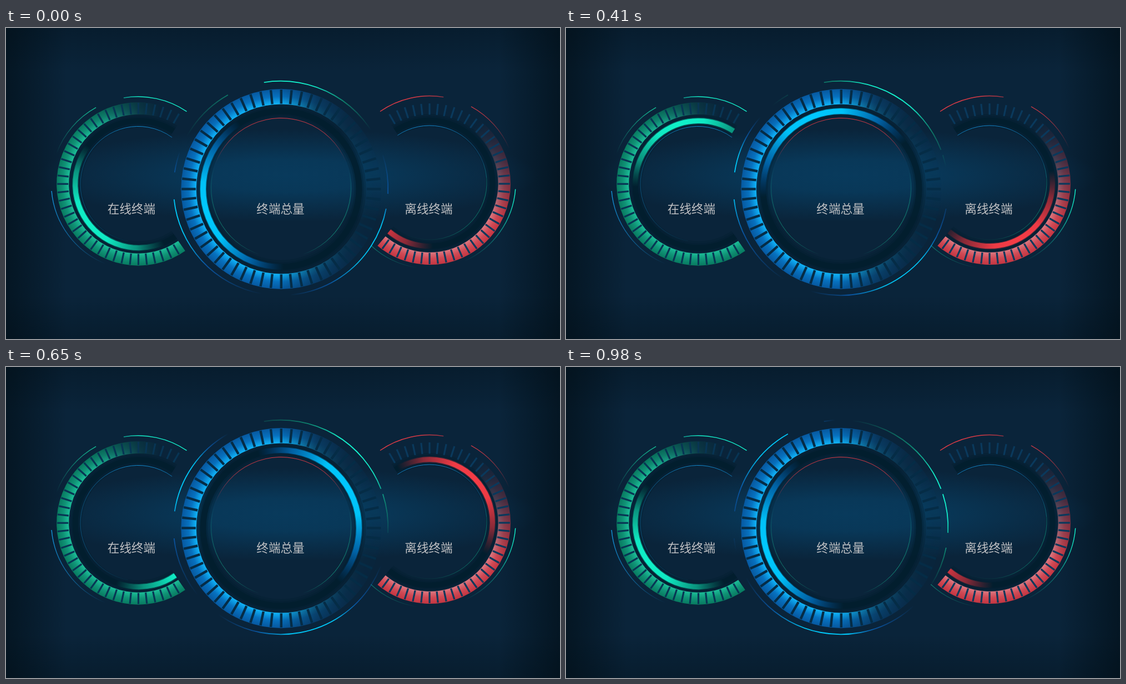
Recreate the animation shown at these times as an HTML page with a canvas. Size 998 by 561 pixels, loop 1.58 s.

```html
<!DOCTYPE html>
<html lang="zh">
<head>
<meta charset="utf-8">
<style>
  html, body { margin: 0; width: 100%; height: 100%; overflow: hidden; background: #0a2337; }
  canvas, svg { position: absolute; left: 0; top: 0; width: 998px; height: 561px; display: block; }
  text { font: 300 21.6px "Noto Sans CJK SC", "Noto Sans CJK", "Noto Sans CJK JP", sans-serif; fill: #bfc0c3; text-anchor: middle; }
</style>
</head>
<body>
<canvas id="stage" width="998" height="561"></canvas>
<svg viewBox="0 0 998 561">
  <text x="226" y="333.5">在线终端</text>
  <text x="494.5" y="333.5">终端总量</text>
  <text x="761.5" y="333.5">离线终端</text>
</svg>
<script>
const W = 998, H = 561, LOOP = 1580;
const rad = deg => deg * Math.PI / 180;
const rgba = (rgb, a) => `rgba(${rgb},${a})`;

const layer = () => {
  const c = document.createElement('canvas');
  c.width = W;
  c.height = H;
  return c.getContext('2d');
};

// Conic gradient whose stops are [degrees from mid, colour], clockwise.
function conic(g, x, y, mid, stops) {
  const grad = g.createConicGradient(rad(mid - 180), x, y);
  stops.forEach(([d, color]) => grad.addColorStop((d + 180) / 360, color));
  return grad;
}

function arc(g, x, y, r, from, to, width, style) {
  g.beginPath();
  g.arc(x, y, r, rad(from), rad(to));
  g.lineWidth = width;
  g.strokeStyle = style;
  g.stroke();
}

// Arc in one colour whose opacity follows [angle, alpha] points.
function fadeArc(g, x, y, r, width, rgb, points) {
  const from = points[0][0], to = points[points.length - 1][0], mid = (from + to) / 2;
  const stops = points.map(([a, alpha]) => [a - mid, rgba(rgb, alpha)]);
  arc(g, x, y, r, from, to, width, conic(g, x, y, mid, stops));
}

const BLUE = '20,150,225', CYAN = '0,205,255', TEAL = '20,250,210', RED = '235,60,70', GREEN = '20,190,150';

const dials = [
  {
    x: 238.5, y: 281.3, inner: 125.3, outer: 147.3, range: [55, 303], tick: 3.2, tickColor: '#083554',
    ring: ['#1cbd98', '#109376', '#087a60'],
    fade: [[55, 1], [222, 1], [243, .8], [258, .45], [272, .14], [287, 0], [303, 0]],
    sweep: { x: 239.3, y: 282, r: 114.6, width: 10, dark: '8,140,120', mid: '14,205,165', core: '16,240,200' }
  },
  {
    x: 495.8, y: 290.5, inner: 153, outer: 180.5, range: [0, 360], tick: 4.4, tickColor: '#052c46',
    ring: ['#10b4f8', '#0771bf', '#07589f'],
    fade: [[0, 0], [28, .03], [46, .12], [68, .38], [80, .7], [92, 1], [268, 1], [280, .72], [292, .32], [312, .1], [340, .03], [360, 0]],
    sweep: { x: 495.5, y: 290.5, r: 140.5, width: 11, dark: '0,80,165', mid: '0,130,222', core: '0,200,255' }
  },
  {
    x: 763, y: 281, inner: 123.7, outer: 146, range: [237, 490], tick: 3.2, tickColor: '#0a395c',
    ring: ['#dc7881', '#d04a55', '#c43541'],
    fade: [[237, 0], [308, 0], [325, .12], [343, .32], [360, .62], [388, 1], [490, 1]],
    sweep: { x: 763, y: 280.2, r: 113.4, width: 10, dark: '150,35,50', mid: '205,48,60', core: '245,60,70' }
  }
];

function drawBackground(g) {
  g.fillStyle = '#0a243a';
  g.fillRect(0, 0, W, H);

  const shade = (x, y, size, a) => {
    const grad = g.createLinearGradient(0, 0, x, y);
    const color = alpha => rgba('0,12,19', alpha);
    grad.addColorStop(0, color(a));
    grad.addColorStop(size, color(0));
    grad.addColorStop(1 - size, color(0));
    grad.addColorStop(1, color(a));
    g.fillStyle = grad;
    g.fillRect(0, 0, W, H);
  };
  shade(W, 0, .11, .58);
  shade(0, H, .14, .3);

  const glow = (x, y, rx, ry, alpha) => {
    g.save();
    g.translate(x, y);
    g.scale(rx, ry);
    const grad = g.createRadialGradient(0, 0, 0, 0, 0, 1);
    [[0, 1], [.35, .88], [.7, .4], [1, 0]].forEach(([p, a]) => grad.addColorStop(p, rgba('8,62,98', a * alpha)));
    g.fillStyle = grad;
    g.fillRect(-1, -1, 2, 2);
    g.restore();
  };
  glow(508, 266, 450, 84, .85);
}

function drawRing(g, d) {
  const mid = (d.inner + d.outer) / 2, width = d.outer - d.inner;
  const [from, to] = d.range;
  const s = d.sweep;

  arc(g, s.x, s.y, s.r, from, to, s.width + 14, 'rgba(3,29,44,.28)');
  arc(g, s.x, s.y, s.r, from, to, s.width + 6, 'rgba(3,29,44,.3)');
  arc(g, s.x, s.y, s.r, from, to, s.width, 'rgba(2,30,45,.8)');

  const ring = layer();
  const grad = ring.createRadialGradient(d.x, d.y, d.inner, d.x, d.y, d.outer);
  d.ring.forEach((color, i) => grad.addColorStop(i / 2, color));
  arc(ring, d.x, d.y, mid, from, to, width, grad);
  ring.globalCompositeOperation = 'destination-in';
  fadeArc(ring, d.x, d.y, mid, width + 2, '0,0,0', d.fade);
  g.drawImage(ring.canvas, 0, 0);

  g.strokeStyle = d.tickColor;
  g.lineWidth = d.tick;
  for (let a = 0; a < 720; a += 6) {
    if (a < from || a > to || a >= from + 360) continue;
    g.beginPath();
    for (const r of [d.inner + 1, d.outer - 1]) {
      g.lineTo(d.x + r * Math.cos(rad(a)), d.y + r * Math.sin(rad(a)));
    }
    g.stroke();
  }
}

function drawThinLines(g) {
  // left dial
  fadeArc(g, 238, 280.3, 156.5, 1.4, TEAL, [[260.4, .55], [272, .95], [304, .95]]);
  fadeArc(g, 238, 280.3, 156.5, 1.3, GREEN, [[200, 0], [222, .55], [241, 1]]);
  fadeArc(g, 238, 280.3, 156.5, 1.4, BLUE, [[112, 0], [140, .5], [165, .85], [175, 1]]);
  fadeArc(g, 238, 281.5, 104, 1, BLUE, [[100, .05], [160, .35], [200, .3], [235, .55], [270, .9], [306, .65]]);
  // centre dial
  fadeArc(g, 495.5, 288.5, 126, 1.1, RED, [[200, 0], [225, .55], [270, .95], [312, .6], [338, 0]]);
  fadeArc(g, 495.5, 288.5, 126, 1, GREEN, [[-15, 0], [10, .5], [40, .75], [72, 0]]);
  fadeArc(g, 495.5, 288.5, 126, 1, GREEN, [[108, 0], [140, .6], [170, .4], [198, 0]]);
  // right dial
  fadeArc(g, 763, 278.6, 156, 1.4, RED, [[235.2, .95], [264, .9], [279.3, .65]]);
  fadeArc(g, 763, 278.6, 156, 1.3, RED, [[298.7, .95], [316, .6], [337, 0]]);
  fadeArc(g, 763, 278.6, 155.2, 1.4, TEAL, [[4.5, 1], [20, .8], [40, .35], [66, 0]]);
  fadeArc(g, 763, 278.6, 155.2, 1.2, GREEN, [[98, 0], [120, .35], [133, .6]]);
  fadeArc(g, 763, 279, 103, 1, BLUE, [[236, .7], [270, .85], [310, .45], [355, .2]]);
  fadeArc(g, 763, 279, 103, 1, GREEN, [[-20, .1], [15, .55], [45, .55], [85, .1], [120, 0]]);
}

const still = layer();
drawBackground(still);
dials.forEach(d => drawRing(still, d));
drawThinLines(still);

// Degrees turned by step, joined by a smooth curve.
const turnSteps = [0, 5, 9, 13, 17, 24, 28], turnAngles = [0, 48, 86, 120, 165, 277, 360];

function turn(step) {
  if (step >= 28) return 360;
  const n = turnSteps.length;
  const slope = i => {
    const a = Math.max(i - 1, 0), b = Math.min(i + 1, n - 1);
    return (turnAngles[b] - turnAngles[a]) / (turnSteps[b] - turnSteps[a]);
  };
  let i = 0;
  while (step >= turnSteps[i + 1]) i++;
  const h = turnSteps[i + 1] - turnSteps[i], u = (step - turnSteps[i]) / h, v = 1 - u;
  return turnAngles[i] * v * v * (1 + 2 * u) + turnAngles[i + 1] * u * u * (3 - 2 * u)
    + h * u * v * (slope(i) * v - slope(i + 1) * u);
}

function drawSweep(g, d, mid) {
  const s = d.sweep;
  const stops = [
    [-180, rgba(s.dark, 0)], [-75, rgba(s.dark, 0)], [-50, rgba(s.mid, .6)], [-22, rgba(s.core, .95)],
    [0, rgba(s.core, 1)], [22, rgba(s.core, .95)], [50, rgba(s.mid, .6)], [75, rgba(s.dark, 0)], [180, rgba(s.dark, 0)]
  ];
  const paint = conic(g, s.x, s.y, mid, stops);
  g.globalAlpha = .3;
  arc(g, s.x, s.y, s.r, ...d.range, s.width + 1.6, paint);
  g.globalAlpha = 1;
  arc(g, s.x, s.y, s.r, ...d.range, s.width - 1, paint);
}

const frameArcs = [[188.5, 240.5], [261, 339], [342, 363], [11, 174]];
const comets = [
  { at: 277, back: 68, ahead: 50, edge: '15,150,120', core: TEAL },
  { at: 30, back: 50, ahead: 55, edge: '10,95,185', core: CYAN },
  { at: 168, back: 68, ahead: 32, edge: '10,95,185', core: CYAN }
];

function drawFrame(g, shift) {
  for (const c of comets) {
    const paint = conic(g, 495, 289, c.at + shift, [
      [-180, rgba(c.edge, 0)], [-c.back, rgba(c.edge, 0)], [-c.back * .5, rgba(c.edge, .8)],
      [-c.back * .2, rgba(c.core, .95)], [0, rgba(c.core, 1)], [c.ahead * .25, rgba(c.core, .9)],
      [c.ahead * .6, rgba(c.edge, .75)], [c.ahead, rgba(c.edge, 0)], [180, rgba(c.edge, 0)]
    ]);
    frameArcs.forEach(([from, to]) => arc(g, 495, 289, 193.3, from, to, 1.8, paint));
  }
}

const view = document.getElementById('stage').getContext('2d');

function render(time) {
  const t = time % LOOP;
  const step = t < 170 ? 0 : Math.min(28, 1 + Math.floor((t - 170) / 30));
  view.drawImage(still.canvas, 0, 0);
  drawFrame(view, 67 * step / 28);
  drawSweep(view, dials[0], 142 + turn(step * 28 / 21));
  drawSweep(view, dials[1], 163 + turn(step));
  drawSweep(view, dials[2], 162 - turn(step * 28 / 24));
}

const start = performance.now();
function tick() {
  render(performance.now() - start);
  requestAnimationFrame(tick);
}
tick();
</script>
</body>
</html>
```
